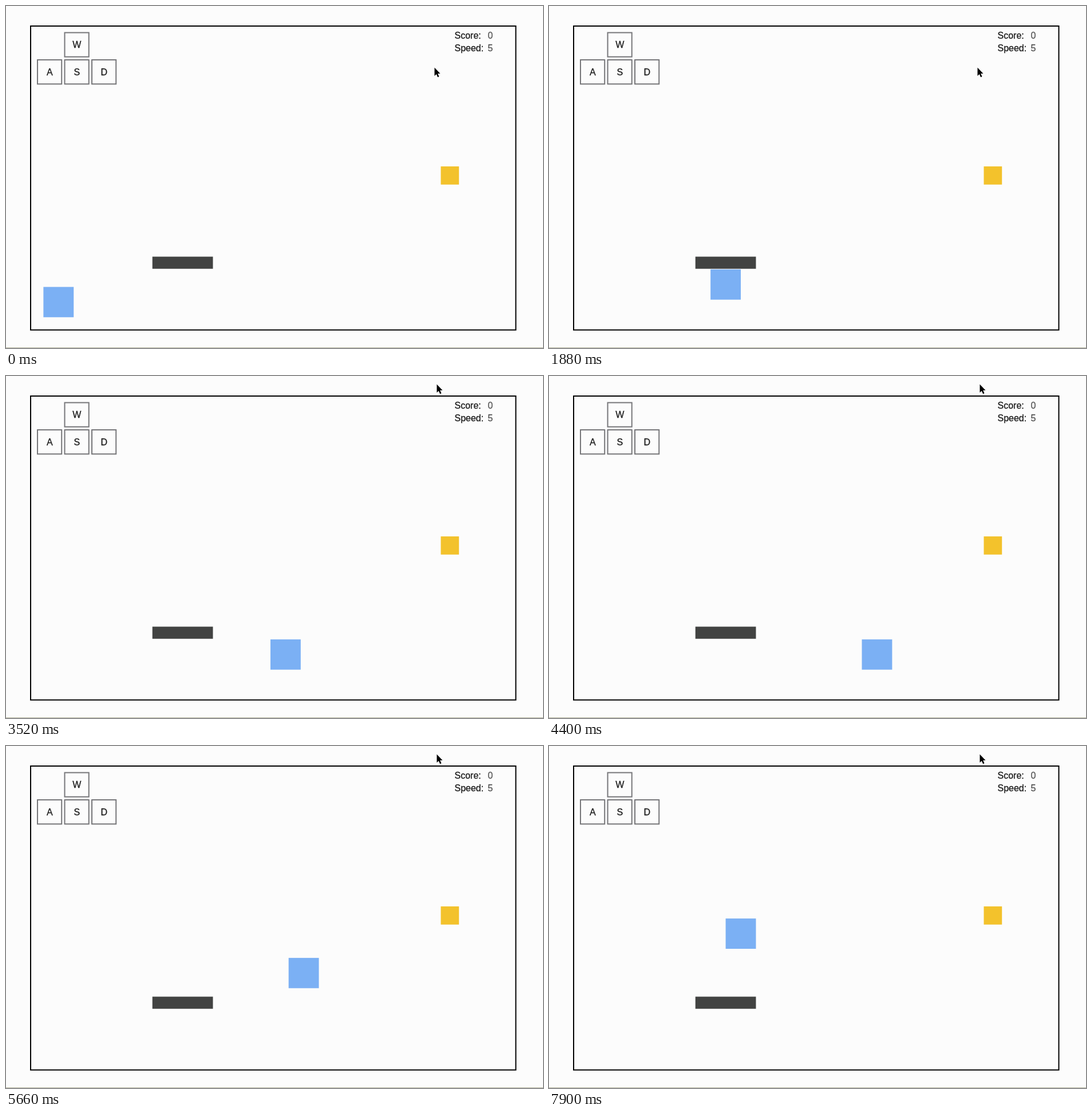
Recreate the animation shown at these times as an HTML page. Size 938 by 597 pixels, loop 8 s.

```html
<!DOCTYPE html>
<html lang="en">
<head>
<meta charset="utf-8">
<title>Square game</title>
<style>
  html, body { margin: 0; width: 100%; height: 100%; overflow: hidden; background: #fcfcfc; }
  svg { display: block; width: 938px; height: 597px; }
  text { font: 16px "Liberation Sans", Arial, sans-serif; fill: #1c1c1c; stroke: #1c1c1c; stroke-width: .3px; }
  .value { fill: #555; stroke: #555; }
  #keys rect { fill: none; stroke: #77777a; stroke-width: 2; }
  #keys text { text-anchor: middle; }
</style>
</head>
<body>
<svg viewBox="0 0 938 597">
  <rect y="596" width="938" height="1" fill="#b4b49c"/>
  <rect x="43" y="35" width="847.5" height="530.5" fill="none" stroke="#000" stroke-width="2"/>
  <g id="keys"></g>
  <text x="783.5" y="57">Score:</text><text class="value" x="841.5" y="57">0</text>
  <text x="783.5" y="78.5">Speed:</text><text class="value" x="841.5" y="78.5">5</text>
  <g transform="translate(44.2 35.7) scale(1.0575)">
    <rect x="200" y="380" width="100" height="20" fill="#424342"/>
    <rect x="676.4" y="231" width="30" height="30" fill="#f3c22c"/>
    <rect id="player" width="50" height="50" fill="#7bb0f4"/>
  </g>
  <path id="cursor" d="M0 0V14.5L3.3 11.5L5.6 16.8L8 15.8L5.7 10.6H10Z" fill="#000" stroke="#fff" stroke-width="1" paint-order="stroke"/>
</svg>
<script>
const LOOP = 8000, SPEED = 5, RESUME = 860;
const start = { x: 20, y: 430 };
// first game frame, distance, direction x, direction y
const moves = [
  [0, 200, 1, 0],
  [40, 29, 0, -1],
  [62, 265, 1, 0],
  [115, 60, -1, 0],
  [127, 150, 0, -1],
  [157, 175, -1, 0]
];
const player = document.getElementById("player");
const cursor = document.getElementById("cursor");

document.getElementById("keys").innerHTML =
  [["W", 102.5, 46.5], ["A", 55, 94], ["S", 102.5, 94], ["D", 150, 94]].map(([letter, x, y]) =>
    `<rect x="${x}" y="${y}" width="42.2" height="42.2"/><text x="${x + 21.3}" y="${y + 26.8}">${letter}</text>`
  ).join("");

const clamp = (v, lo, hi) => Math.min(hi, Math.max(lo, v));

// Frames last 20, 20 and 100 ms in turn.
const ticks = ms => 3 * Math.floor(ms / 140) + Math.min(2, Math.floor(ms % 140 / 20));

// The picture stalls after the seventh frame, then jumps ahead.
const gameFrame = ms => ms < RESUME ? Math.min(7, ticks(ms + 20) - 1) : 40 + ticks(ms - RESUME);

function draw(ms) {
  const frame = gameFrame(ms);
  let { x, y } = start;
  for (const [first, distance, dx, dy] of moves) {
    const travelled = clamp((frame - first) * SPEED, 0, distance);
    x += dx * travelled;
    y += dy * travelled;
  }
  player.setAttribute("x", x);
  player.setAttribute("y", y);

  const p = clamp((frame - 72.4) / 14, 0, 1);
  const ease = p * p * (3 - 2 * p);
  const cursorX = 748.5 + 4 * ease - 13 * ease * (1 - ease);
  cursor.setAttribute("transform", `translate(${cursorX} ${107.5 - 93 * ease})`);
}

const began = performance.now();
function loop() {
  draw((performance.now() - began) % LOOP);
  requestAnimationFrame(loop);
}
loop();
</script>
</body>
</html>
```
